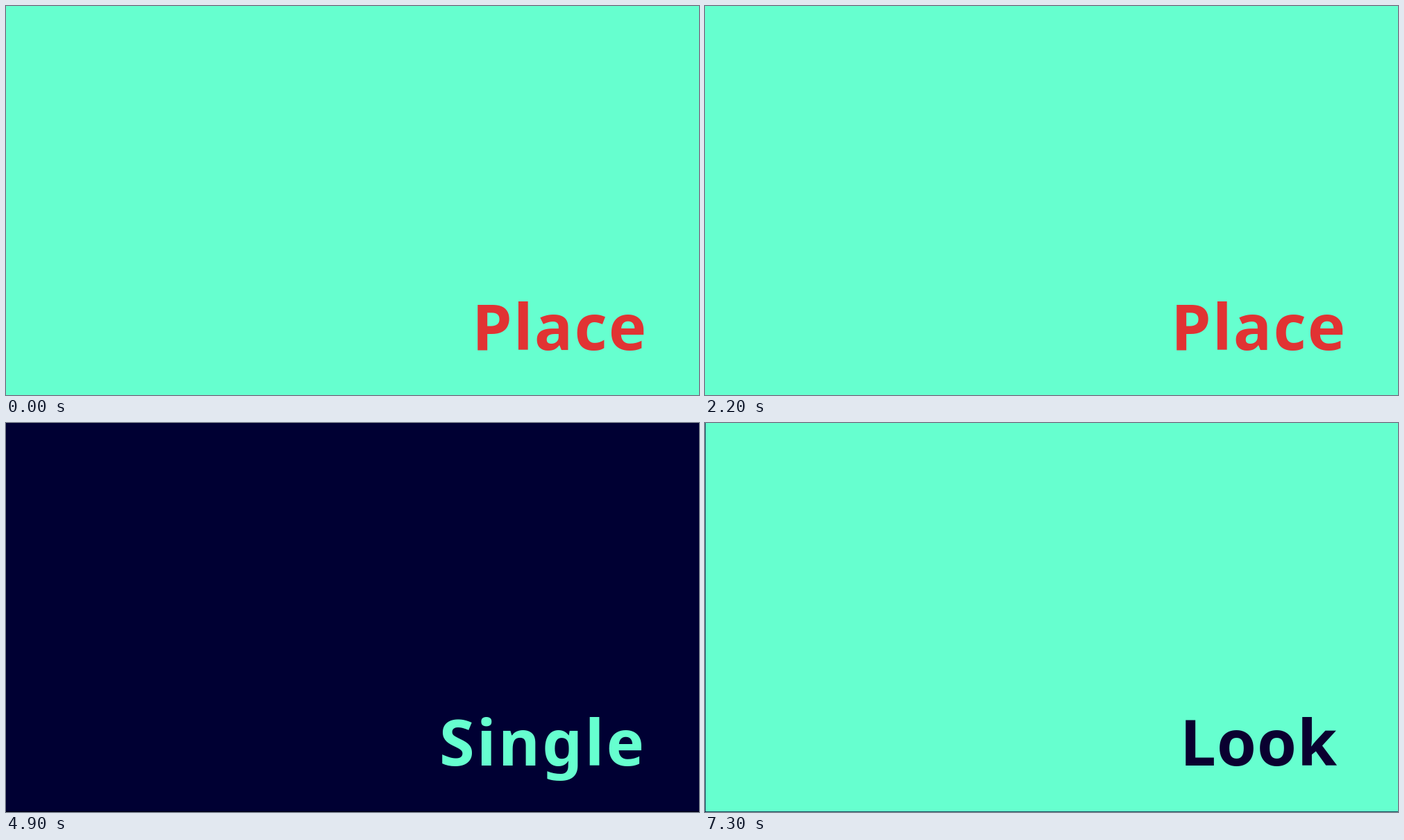
Animation of 998 by 561 pixels, one loop 8.1 s. Source, as an HTML page with a canvas:

```html
<!DOCTYPE html>
<html lang="en">
<head>
<meta charset="utf-8">
<title>Place, Single, Look</title>
<style>
  html, body { margin: 0; width: 100%; height: 100%; overflow: hidden; }
  canvas { display: block; }
</style>
</head>
<body>
<canvas id="stage" width="998" height="561"></canvas>
<script>
const W = 998, H = 561, LOOP = 8100, STEP = 100;
const MINT = '#66ffcf', RED = '#e13333', NAVY = '#000033';
const ctx = document.getElementById('stage').getContext('2d');

const circle = (x, y, r) =>
  `M${x - r} ${y}a${r} ${r} 0 1 0 ${2 * r} 0a${r} ${r} 0 1 0 ${-2 * r} 0z`;

const pin = new Path2D(
  'M393 233A106 106 0 0 1 605 233C605 290 550 352 506 389' +
  'Q499 396 492 389C448 352 393 290 393 233z' + circle(499, 234, 52));

const eye = new Path2D(
  'M368 258C402 216 448 174 499 174S596 216 630 258Q634 264 630 270' +
  'C596 312 550 354 499 354S402 312 368 270Q364 264 368 258z' +
  circle(499, 264, 58) + circle(499, 264, 34));

const scenes = [
  { until: 2500, word: 'Place', x: 671, y: 496, spacing: 2, ink: RED, paper: MINT,
    icon: { path: pin, left: 393, start: 1, soft: true } },
  { until: 5100, word: 'Single', x: 624, y: 494, spacing: 3, ink: MINT, paper: NAVY, edge: '#000' },
  { until: LOOP, word: 'Look', x: 684, y: 494, spacing: 1, ink: '#0a0030', paper: MINT, edge: NAVY, side: true,
    icon: { path: eye, left: 366, start: 52.7 } },
];

// Distance covered by a slowly accelerating wipe after s steps.
const travel = s => s > 0 ? 13 * s + 0.7 * s * s : 0;
const LAG = 8;

function drawIcon({ path, left, start, soft }, ink, step) {
  const s = step - start;
  if (s <= 0) return;
  const at = d => Math.min(1, (left + d) / W);
  const rear = at(travel(s - LAG)), front = at(travel(s));
  const solid = soft ? at(travel(s - 1)) : front;
  const fill = ctx.createLinearGradient(0, 0, W, 0);
  fill.addColorStop(rear, ink + '00');
  fill.addColorStop(rear, ink);
  fill.addColorStop(solid, ink);
  fill.addColorStop(front, ink + (soft ? '20' : 'ff'));
  fill.addColorStop(front, ink + '00');
  ctx.fillStyle = fill;
  ctx.fill(path, 'evenodd');
}

function draw(now) {
  const step = Math.floor((now % LOOP) / STEP);
  const scene = scenes.find(s => step * STEP < s.until);
  ctx.fillStyle = scene.paper;
  ctx.fillRect(0, 0, W, H);
  if (scene.icon) drawIcon(scene.icon, scene.ink, step);

  ctx.fillStyle = scene.ink;
  ctx.font = '700 92px "Noto Sans", sans-serif';
  ctx.letterSpacing = scene.spacing + 'px';
  ctx.fillText(scene.word, scene.x, scene.y);

  if (scene.edge) {
    ctx.globalAlpha = 0.7;
    ctx.fillStyle = scene.edge;
    ctx.fillRect(0, H - 1, W, 1);
    if (scene.side) ctx.fillRect(0, 0, 1, H);
    ctx.globalAlpha = 1;
  }
}

const began = performance.now();
function tick() {
  draw(performance.now() - began);
  requestAnimationFrame(tick);
}
tick();
</script>
</body>
</html>
```
